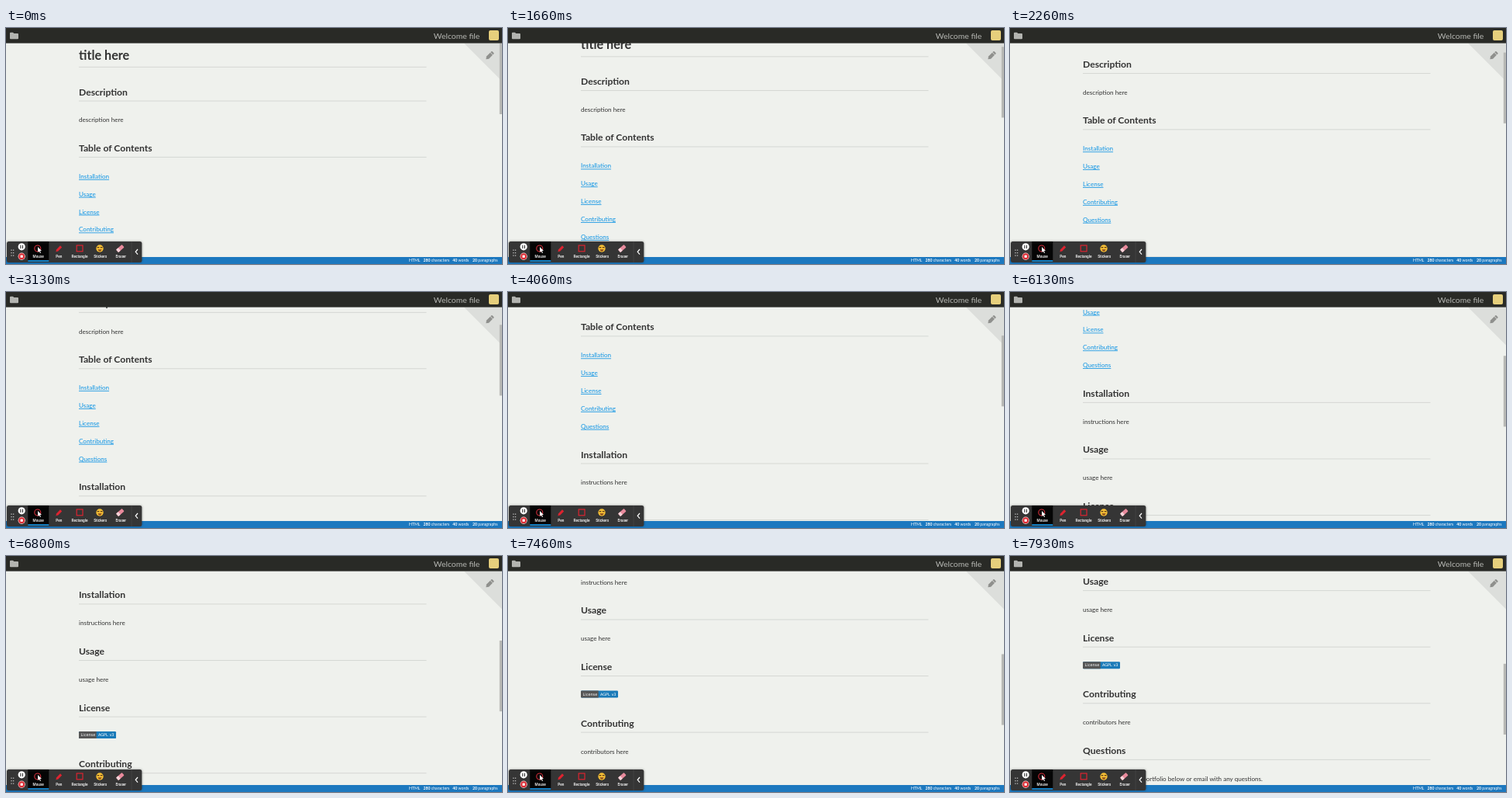
These frames come from a looping animation (640x304 px, 8 s). An HTML page:

```html
<!DOCTYPE html>
<html lang="en">
<head>
<meta charset="utf-8">
<title>Document preview scrolling</title>
<style>
  @property --scroll { syntax: "<number>"; inherits: true; initial-value: 0; }

  html, body { margin: 0; width: 100%; height: 100%; overflow: hidden; background: #eff1ed; }
  svg { display: block; width: 100vw; height: 100vh; font-family: Lato, sans-serif; animation: scroll 8s linear infinite; }

  @keyframes scroll {
    0%, 10.9% { --scroll: 0; }
    20.75% { --scroll: 13.4; }
    39.125% { --scroll: 67.6; }
    61.625% { --scroll: 148.6; }
    76.625% { --scroll: 188; }
    85% { --scroll: 268.5; }
    99.125%, 100% { --scroll: 358.5; }
  }

  #page { transform: translateY(calc(var(--scroll) * -1px)); }
  #thumb { transform: translateY(calc(var(--scroll) * 0.332px)); }

  #page text { font-size: 8.1px; fill: #333; }
  #page .h1 { font-size: 16.2px; font-weight: 700; }
  #page .h2 { font-size: 12.15px; font-weight: 700; }
  #page .link { fill: #0c93e4; text-decoration: underline; }
  #page .badge { font: 4.95px "DejaVu Sans", sans-serif; fill: #fff; }
  .rule { stroke: #cfd1cd; stroke-width: .8; }
  .status { font-size: 5.2px; fill: #fff; }
  .status .count { font-weight: 700; }
  .tool { font: 500 4.7px Roboto, sans-serif; fill: #fff; text-anchor: middle; }
</style>
</head>
<body>
<svg viewBox="0 0 640 304" preserveAspectRatio="none">
  <defs>
    <filter id="shadow" x="-10%" y="-40%" width="120%" height="180%">
      <feDropShadow dx="0" dy="0" stdDeviation="1.5" flood-opacity=".4"/>
    </filter>
  </defs>
  <rect width="640" height="304" fill="#eff1ed"/>

  <g id="page">
    <text class="h1" x="94" y="40.5">title here</text>
    <path class="rule" d="M94 50.3H542.5"/>
    <g id="sections"></g>
    <g transform="translate(94 494.7)">
      <rect width="48" height="9" rx="1.2" fill="#1a7ab8"/>
      <path d="M1.2 0H22.7V9H1.2Q0 9 0 7.8V1.2Q0 0 1.2 0Z" fill="#555"/>
      <text class="badge" x="2.6" y="6.3">License</text>
      <text class="badge" x="25" y="6.3">AGPL v3</text>
    </g>
    <text x="326" y="648.5" text-anchor="end">portfolio below or email with any questions.</text>
  </g>

  <path d="M591 19.5H640V68.5Z" fill="#dcdedb"/>
  <g transform="translate(624.2 35.4) rotate(-45)" fill="#8f908d">
    <path d="M-6.8 0L-3.8 -2.2H3V2.2H-3.8Z"/>
    <path d="M3.7 -2.2H5Q6 -2.2 6 -1.2V1.2Q6 2.2 5 2.2H3.7Z"/>
  </g>
  <rect id="thumb" x="636.8" y="19.8" width="3.2" height="91.2" fill="#b7b8b5"/>

  <rect width="640" height="19.6" fill="#292a26"/>
  <path d="M5 6.8Q5 5.8 6 5.8H9L10.3 7.1H15Q16 7.1 16 8.1V13.2Q16 14.2 15 14.2H6Q5 14.2 5 13.2Z" fill="#b3b4b0"/>
  <text x="611.3" y="13.8" font-size="10.4" text-anchor="end" fill="#b8b9b5">Welcome file</text>
  <rect x="623" y="3" width="13" height="13" rx="2" fill="#e6cf7c"/>

  <rect y="295" width="640" height="9" fill="#1c78bf"/>
  <g class="status">
    <text x="520" y="301.4">HTML</text>
    <text x="538.4" y="301.4"><tspan class="count">280</tspan> characters</text>
    <text x="576.2" y="301.4"><tspan class="count">40</tspan> words</text>
    <text x="602" y="301.4"><tspan class="count">20</tspan> paragraphs</text>
  </g>

  <g id="toolbar">
    <rect x="1" y="275" width="174.3" height="27" rx="2.5" fill="#343434" filter="url(#shadow)"/>
    <rect x="28.3" y="275" width="27" height="25.5" fill="#050505"/>
    <rect x="28.3" y="299.2" width="27" height="1.6" fill="#159bee"/>
    <path d="M162 275V302" stroke="#4a4a4a" stroke-width=".7"/>
    <path d="M7 285.5V294M9.6 285.5V294" stroke="#c4c4c4" stroke-width="1.3" stroke-dasharray="1.3 2.2"/>
    <circle cx="20.2" cy="281.8" r="4.6" fill="#fff"/>
    <path d="M18.9 279.7V283.9M21.5 279.7V283.9" stroke="#333" stroke-width="1.1"/>
    <circle cx="20.2" cy="294.2" r="4.6" fill="#f3dcdc"/>
    <circle cx="20.2" cy="294.2" r="3.9" fill="#db2d35"/>
    <rect x="18.6" y="292.6" width="3.2" height="3.2" fill="#fff"/>

    <circle cx="40.8" cy="284" r="4" fill="none" stroke="#d8303c" stroke-width="1.1"/>
    <path d="M41 282L41.2 289L42.8 287.5L44 290L45 289.5L43.9 287.1H46Z" fill="#fff"/>
    <path d="M64.3 288.3L65.2 285.2L70 280.2L72.2 282.4L67.3 287.4Z" fill="#dc2430"/>
    <rect x="91.2" y="280" width="7.8" height="7.8" fill="none" stroke="#dc2430" stroke-width="1.2"/>
    <circle cx="121" cy="284" r="4.7" fill="#f5bf35"/>
    <path d="M117.6 282.7H120.3M121.8 282.7H124.5" stroke="#5a3b18" stroke-width="1.3"/>
    <path d="M118.5 285.3H123.6Q123 287.7 121 287.7T118.5 285.3Z" fill="#8a4a20"/>
    <g transform="translate(147.3 284) rotate(-42)">
      <rect x="-5" y="-2.3" width="10" height="4.6" rx=".8" fill="#e88a9c"/>
      <rect x="-5" y="-2.3" width="3.6" height="4.6" rx=".8" fill="#f5d5da"/>
    </g>
    <g class="tool" id="labels"></g>
    <path d="M170 285L167.2 288.3L170 291.6" fill="none" stroke="#fff" stroke-width="1.2"/>
  </g>
</svg>
<script>
  const LEFT = 94;
  const byId = id => document.getElementById(id);
  const label = (text, x, y, cls = "") => `<text class="${cls}" x="${x}" y="${y}">${text}</text>`;

  const section = ([title, ruleY, ...lines]) =>
    label(title, LEFT, ruleY - 7.5, "h2") +
    `<path class="rule" d="M${LEFT} ${ruleY}H542.5"/>` +
    lines.map(line => label(line, LEFT, ruleY + 27.4)).join("");

  const topics = ["Installation", "Usage", "License", "Contributing", "Questions"];
  const bodies = { Installation: "instructions here", Usage: "usage here", Contributing: "contributors here" };

  const sections = [
    ["Description", 94, "description here"],
    ["Table of Contents", 166.4],
    ...topics.map((name, i) => [name, 330.5 + i * 72.6, ...(bodies[name] ? [bodies[name]] : [])])
  ];
  const links = topics.map((name, i) => label(name, LEFT, 193.9 + i * 22.85, "link"));

  byId("sections").innerHTML = sections.map(section).join("") + links.join("");
  byId("labels").innerHTML = ["Mouse", "Pen", "Rectangle", "Stickers", "Eraser"]
    .map((name, i) => label(name, 41.7 + i * 26.65, 295.6)).join("");
</script>
</body>
</html>
```
